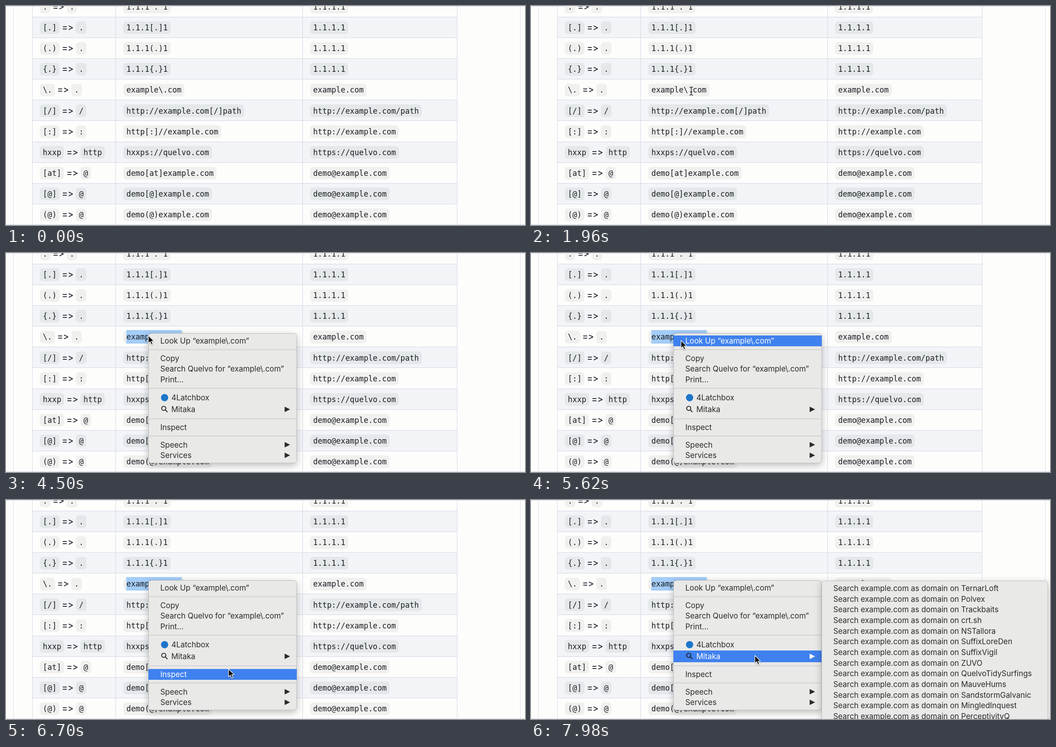
Recreate the animation shown at these times as an HTML page. Size 1152x486 px, loop 8 s.

```html
<!DOCTYPE html>
<html lang="en">
<head>
<meta charset="utf-8">
<title>Context menu search</title>
<style>
  html, body { margin: 0; width: 100%; height: 100%; overflow: hidden; background: #fdfdfc; }
  svg { display: block; width: 1152px; height: 486px; }
  text { white-space: pre; }
  .code { font: 16.94px "DejaVu Sans Mono", monospace; fill: #1b1f23; }
  .arrow { font: 500 19.5px Inter, sans-serif; font-feature-settings: "calt" 0; fill: #24292e; text-anchor: middle; }
  .item { font: 16.9px Inter, sans-serif; fill: #2a2a2a; }
  .on { fill: #fff; }
  .panel { fill: #e9e9e8; stroke: #bdbdbd; stroke-width: 1; filter: drop-shadow(0 5px 8px rgba(0, 0, 0, .25)); }
</style>
</head>
<body>
<svg id="stage" viewBox="0 0 1152 486"></svg>
<script>
const LOOP = 8000, CHAR = 10.2, PAD = 6.8, ROW = 46.13;
const MENU_AT = 4220, SUBMENU_AT = 7560;
const stage = document.getElementById('stage');

function add(parent, tag, attrs, text) {
  const el = document.createElementNS('http://www.w3.org/2000/svg', tag);
  for (const k in attrs) el.setAttribute(k, attrs[k]);
  if (text !== undefined) el.textContent = text;
  parent.appendChild(el);
  return el;
}
const rect = (parent, x, y, width, height, fill, rx = 0) =>
  add(parent, 'rect', { x, y, width, height, fill, rx });
const label = (parent, x, mid, text, cls) =>
  add(parent, 'text', { x, y: mid + 6, class: cls }, text);
const show = (el, on) => el.setAttribute('visibility', on ? 'visible' : 'hidden');

// Table: before, after, defanged sample, clean sample
const rows = [
  ['.', '.', '1.1.1 . 1', '1.1.1.1'],
  ['[.]', '.', '1.1.1[.]1', '1.1.1.1'],
  ['(.)', '.', '1.1.1(.)1', '1.1.1.1'],
  ['{.}', '.', '1.1.1{.}1', '1.1.1.1'],
  ['\\.', '.', 'example\\.com', 'example.com'],
  ['[/]', '/', 'http://example.com[/]path', 'http://example.com/path'],
  ['[:]', ':', 'http[:]//example.com', 'http://example.com'],
  ['hxxp', 'http', 'hxxps://quelvo.com', 'https://quelvo.com'],
  ['[at]', '@', 'demo[at]example.com', 'demo@example.com'],
  ['[@]', '@', 'demo[@]example.com', 'demo@example.com'],
  ['(@)', '@', 'demo(@)example.com', 'demo@example.com']
];
const pills = [];
const page = add(stage, 'g', {});
const lineY = i => Math.round(23.8 + ROW * i);

rect(page, 0, 0, 1152, 486, '#fdfdfc');
rows.forEach((_, i) => {
  if (i % 2) rect(page, 58, lineY(i - 1), 944, 46, '#f2f4f8');
});
rows.forEach((_, i) => rect(page, 58, lineY(i), 944, 1, '#d5d8e4'));
[58, 243, 658, 1001].forEach(x => rect(page, x, 0, 1, 486, '#d5d8e4'));
[16, 1141].forEach(x => rect(page, x, 0, 1, 486, '#dddeea'));
[0, 485].forEach(y => rect(page, 0, y, 1152, 1, '#d0d1de'));

const selection = rect(stage, 267, 171, 123, 30, '#a4cdf8');
const words = add(stage, 'g', {});

function pill(x, mid, text, shaded) {
  const w = text.length * CHAR + 2 * PAD - .4;
  rect(page, x, mid - 14, w, 28, shaded ? '#e4e8ea' : '#f0f0ef', 7);
  label(words, x + PAD, mid, text, 'code');
  pills.push([x, mid - 14, x + w, mid + 14]);
  return x + w;
}
rows.forEach(([from, to, raw, clean], i) => {
  const mid = 1.9 + ROW * i, dark = i % 2;
  const end = pill(75, mid, from, dark);
  label(words, end + 18.2, mid, '=>', 'arrow');
  pill(end + 36.3, mid, to, dark);
  pill(260.4, mid, raw, dark);
  pill(675, mid, clean, dark);
});

// Context menu: label, centre, top, bottom, text x, has submenu
const items = [
  ['Look Up “example\\.com”', 195, 183, 207, 342.5],
  ['Copy', 233.5, 222, 245, 342.5],
  ['Search Quelvo for “example\\.com”', 257, 245, 269, 342.5],
  ['Print...', 281, 269, 293, 342.5],
  ['4Latchbox', 321, 308, 334, 367],
  ['Mitaka', 347, 334, 360, 367, true],
  ['Inspect', 387, 375, 399, 342.5],
  ['Speech', 425.5, 414, 437, 342.5, true],
  ['Services', 449, 437, 461, 342.5, true]
];
const menu = add(stage, 'g', {});
add(menu, 'rect', { x: 316.5, y: 178.5, width: 328.5, height: 287.5, rx: 6, class: 'panel' });
[213.5, 299, 367, 405].forEach(y => rect(menu, 317, y, 328, 2, '#d3d3d3'));
const bar = rect(menu, 316, 0, 329.5, 24, '#3f81ee');
const entries = items.map(([text, mid, top, bottom, x, more]) => {
  const parts = [label(menu, x, mid, text, 'item')];
  if (more) parts.push(add(menu, 'path', { d: `M618.5 ${mid - 6}l12 6l-12 6z`, class: 'item' }));
  return { top, bottom, parts };
});
add(menu, 'circle', { cx: 352, cy: 321, r: 8, fill: '#1c76c9' });
add(menu, 'path', {
  d: 'M345.5 344.7a4.6 4.6 0 1 0 9.2 0a4.6 4.6 0 1 0 -9.2 0M353.5 348.2l5 5',
  fill: 'none', stroke: '#1c1c1c', 'stroke-width': 1.9
});

const submenu = add(stage, 'g', {});
add(submenu, 'rect', { x: 645.5, y: 179.5, width: 501.5, height: 340, rx: 6, class: 'panel' });
['TernarLoft', 'Polvex', 'Trackbaits', 'crt.sh', 'NSTallora', 'SuffixLoreDen', 'SuffixVigil',
  'ZUVO', 'QuelvoTidySurfings', 'MauveHums', 'SandstormGalvanic', 'MingledInquest', 'PerceptivityQ']
  .forEach((name, i) =>
    label(submenu, 671, 196 + 23.68 * i, 'Search example.com as domain on ' + name, 'item'));

// Pointers
const arrow = add(stage, 'path', {
  d: 'M0 0V17.4L4 13.7L6.9 20.4L9.8 19.2L7 12.6H12.4Z',
  fill: '#000', stroke: '#fff', 'stroke-width': 1.3, 'stroke-linejoin': 'round',
  style: 'filter: drop-shadow(0 1px 1px rgba(0,0,0,.35))'
});
const beam = add(stage, 'g', { fill: 'none', 'stroke-linecap': 'round' });
[['#fff', 3], ['#111', 1.4]].forEach(([stroke, w]) => add(beam, 'path', {
  d: 'M-3.5 -9Q0 -9 0 -6Q0 -9 3.5 -9M0 -6V6M-3.5 9Q0 9 0 6Q0 9 3.5 9M-2 2H2',
  stroke, 'stroke-width': w
}));

// Pointer stops: time, x, y
const path = [
  [0, 800, 500], [120, 800, 500], [800, 413, 197], [1400, 413, 197], [2400, 316, 183],
  [5020, 316, 183], [5560, 333, 194], [5860, 333, 194], [6600, 494, 375],
  [6800, 494, 375], [7300, 497, 345], [LOOP, 497, 345]
];
function pointerAt(t) {
  const i = path.findIndex(p => p[0] > t);
  const [t0, x0, y0] = path[i - 1], [t1, x1, y1] = path[i];
  const u = (t - t0) / (t1 - t0), k = u * u * (3 - 2 * u);
  return [x0 + (x1 - x0) * k, y0 + (y1 - y0) * k];
}

function draw(t) {
  const [x, y] = pointerAt(t), open = t >= MENU_AT;
  const overText = !open && pills.some(([l, top, r, b]) => x >= l && x <= r && y >= top && y <= b);
  show(selection, open);
  show(menu, open);
  show(submenu, t >= SUBMENU_AT);

  const hit = open && x > 316.5 ? entries.find(e => y >= e.top && y < e.bottom) : null;
  bar.setAttribute('opacity', hit ? 1 : 0);
  if (hit) {
    bar.setAttribute('y', hit.top);
    bar.setAttribute('height', hit.bottom - hit.top);
  }
  entries.forEach(e => e.parts.forEach(p => p.classList.toggle('on', e === hit)));

  show(arrow, !overText);
  show(beam, overText);
  (overText ? beam : arrow).setAttribute('transform', `translate(${x} ${y})`);
}

const start = performance.now();
function tick() {
  draw((performance.now() - start) % LOOP);
  requestAnimationFrame(tick);
}
tick();
</script>
</body>
</html>
```
